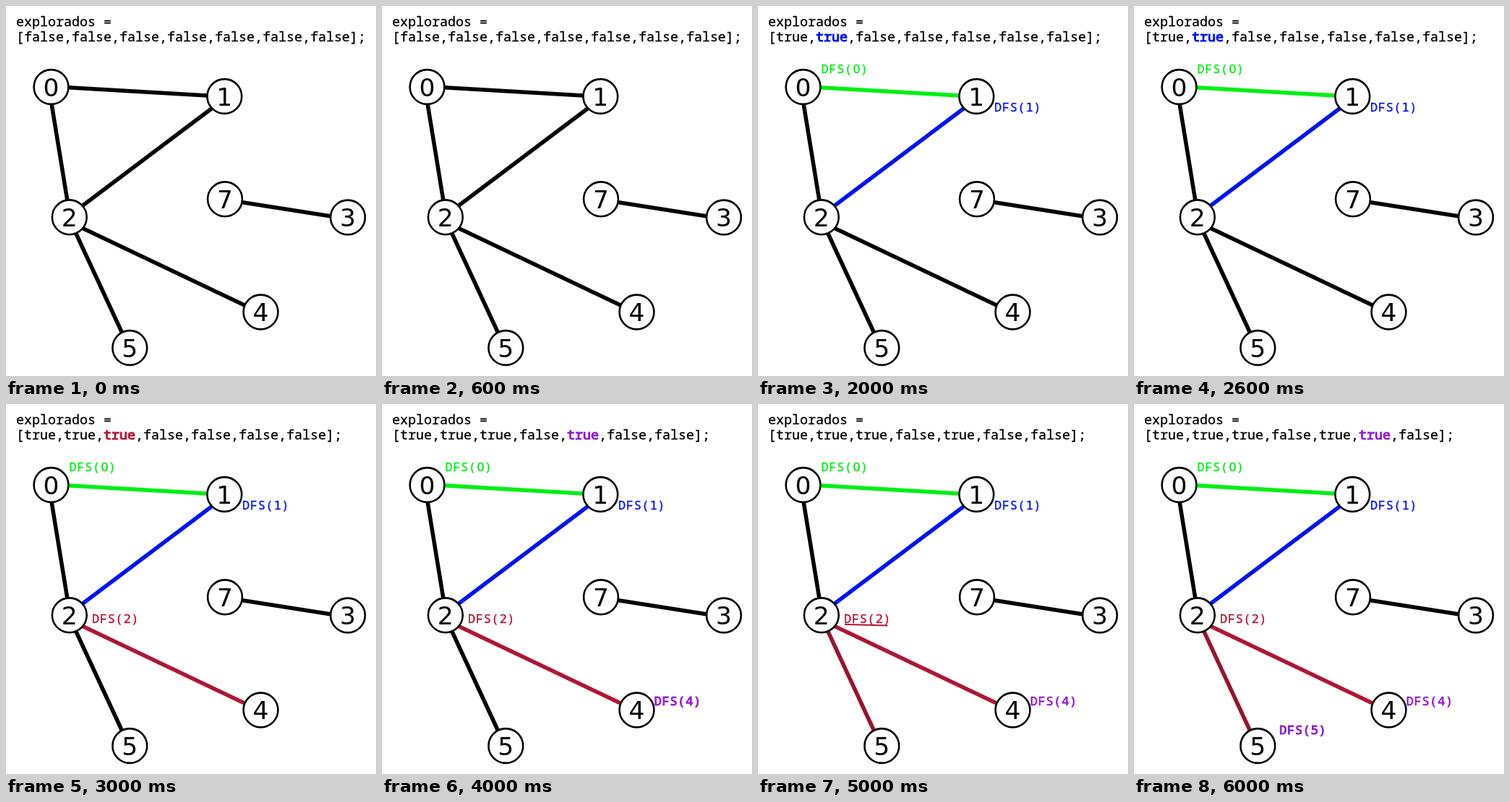
Animation of 512x512 px, one loop 7000 ms. Source, as an HTML page with a canvas:

```html
<!DOCTYPE html>
<html lang="es">
<head>
<meta charset="utf-8">
<title>DFS</title>
<style>
  html, body { margin: 0; width: 100%; height: 100%; overflow: hidden; background: #fff; }
  canvas { display: block; width: 512px; height: 512px; }
</style>
</head>
<body>
<canvas id="stage" width="512" height="512"></canvas>
<script>
const ctx = document.getElementById('stage').getContext('2d');
const STEP_MS = 1000;
const MONO_FAMILY = '"Noto Sans Mono", "DejaVu Sans Mono", monospace';
const ARRAY_FONT = '18.33px ' + MONO_FAMILY;
const LABEL_FONT = '16.8px ' + MONO_FAMILY;
const LABEL_DIGIT = '16.5px "DejaVu Sans", sans-serif';
const NODE_DIGIT = '34.5px "DejaVu Sans", sans-serif';
const REGULAR = 0.35, SEMIBOLD = 0.7, BOLD = 1.1;

const BLACK = '#000', GREEN = '#00f014', BLUE = '#0014f0';
const CRIMSON = '#b01535', WINE = '#98142f', PURPLE = '#8f1fd6';

const nodes = [
  [0, 62.5, 112], [1, 302.3, 125], [2, 87.8, 292.3], [3, 473, 292.5],
  [4, 352.5, 423.5], [5, 171.3, 473], [7, 303, 267.3]
];

// Each edge takes its colour from the given step on.
const edges = [
  { line: [86, 112.7, 279, 124], color: GREEN, from: 1 },
  { line: [63, 135, 85, 270], color: BLACK, from: 0 },
  { line: [285, 141.5, 105, 277], color: BLUE, from: 2 },
  { line: [105, 307, 331, 414.5], color: CRIMSON, from: 3 },
  { line: [96.5, 314, 160.5, 452], color: WINE, from: 5 },
  { line: [326, 271.5, 450, 291], color: BLACK, from: 0 }
];

const labels = [
  { node: 0, x: 87.5, y: 92.7, color: GREEN, from: 1 },
  { node: 1, x: 327, y: 145.7, color: BLUE, from: 2 },
  { node: 2, x: 119, y: 302.7, color: CRIMSON, from: 3 },
  { node: 4, x: 376.7, y: 416.7, color: PURPLE, from: 4, bold: true },
  { node: 5, x: 201.2, y: 457.2, color: PURPLE, from: 6, bold: true }
];

// The array slot that turns true at each step.
const visits = [null, 0, 1, 2, 4, null, 5];

function line(x1, y1, x2, y2, color, width) {
  ctx.strokeStyle = color;
  ctx.lineWidth = width;
  ctx.beginPath();
  ctx.moveTo(x1, y1);
  ctx.lineTo(x2, y2);
  ctx.stroke();
}

// Draws a run of text and returns where the next run starts.
function text(str, x, y, color, weight, font = ARRAY_FONT) {
  ctx.font = font;
  ctx.fillStyle = ctx.strokeStyle = color;
  ctx.fillText(str, x, y);
  if (weight) {
    ctx.lineWidth = weight;
    ctx.strokeText(str, x, y);
  }
  return x + ctx.measureText(str).width;
}

function centered(str, x, y, color, weight, font) {
  ctx.textAlign = 'center';
  text(str, x, y, color, weight, font);
  ctx.textAlign = 'left';
}

function drawArray(step) {
  const visited = visits.slice(0, step + 1);
  text('explorados =', 14, 28, BLACK, REGULAR);
  let x = text('[', 14, 49, BLACK, REGULAR);
  for (let i = 0; i < 7; i++) {
    const fresh = visits[step] === i;
    const color = fresh ? labels.find(l => l.node === i).color : BLACK;
    x = text(String(visited.includes(i)), x, 49, color, fresh ? BOLD : REGULAR);
    x = text(i < 6 ? ',' : '];', x, 49, BLACK, REGULAR);
  }
}

function drawLabel({ node, x, y, color, from, bold }, step) {
  const weight = !bold ? REGULAR : step === from ? BOLD : SEMIBOLD;
  ctx.letterSpacing = '0.8px';
  const digitX = text('DFS(', x, y, color, weight, LABEL_FONT);
  const cell = ctx.measureText('0').width;
  text(')', digitX + cell, y, color, weight, LABEL_FONT);
  ctx.letterSpacing = '0px';
  centered(String(node), digitX + cell / 2, y, color, weight, LABEL_DIGIT);
}

function drawNode([name, x, y]) {
  ctx.beginPath();
  ctx.arc(x, y, 23.9, 0, Math.PI * 2);
  ctx.fillStyle = '#fff';
  ctx.fill();
  ctx.strokeStyle = BLACK;
  ctx.lineWidth = 2.6;
  ctx.stroke();
  centered(String(name), x, y + 12.5, BLACK, 0, NODE_DIGIT);
}

function draw(step) {
  ctx.fillStyle = '#fff';
  ctx.fillRect(0, 0, 512, 512);
  drawArray(step);
  for (const e of edges) line(...e.line, step >= e.from ? e.color : BLACK, 5.5);
  nodes.forEach(drawNode);
  labels.filter(l => step >= l.from).forEach(l => drawLabel(l, step));
  if (step === 5) line(120, 305, 179.5, 306.5, CRIMSON, 2);
}

const start = performance.now();
function tick() {
  const elapsed = Math.max(0, performance.now() - start);
  draw(Math.floor(elapsed / STEP_MS) % visits.length);
  requestAnimationFrame(tick);
}
tick();
</script>
</body>
</html>
```
